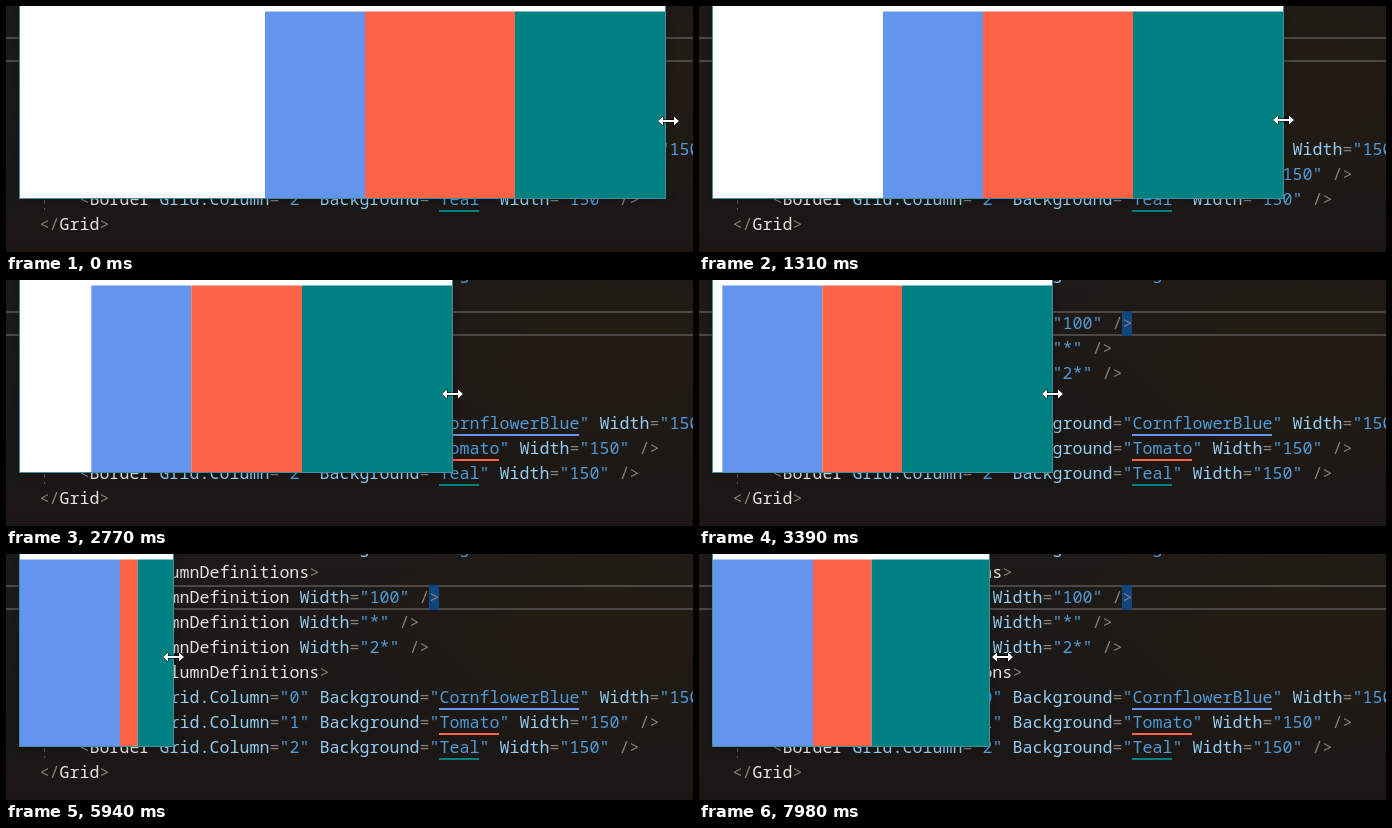
These frames come from a looping animation (687x246 px, 8 s). An HTML page:

```html
<!DOCTYPE html>
<html lang="en">
<head>
<meta charset="utf-8">
<title>Resizing a grid</title>
<style>
  html, body { margin: 0; width: 100%; height: 100%; overflow: hidden; background: #1b1816; }
  svg {
    display: block; width: 687px; height: 246px;
    background:
      radial-gradient(ellipse 260px 130px at 600px 85px, #241c13 0, #241c1300 100%),
      linear-gradient(#1e1a17, #1b1816 60%, #1c1715);
  }
  text { font: 300 16.667px "Noto Sans Mono", "DejaVu Sans Mono", monospace; white-space: pre; }
  .mark { fill: #857f78; }
  .name { fill: #e4e4e2; }
  .attr { fill: #93cdf3; }
  .value { fill: #4f9bd8; }
  #win { filter: drop-shadow(0 0 5px rgba(0, 0, 0, .25)); }
</style>
</head>
<body>
<svg viewBox="0 0 687 246">
  <path d="M0 32H687M0 55H687" stroke="#4b4845" stroke-width="2"/>
  <path d="M38.5 130V204" stroke="#55504b" stroke-dasharray="4 4"/>
  <rect x="423" y="31" width="10" height="25" fill="#11457e"/>
  <g id="code"></g>
  <g id="win">
    <rect id="frame" x="13" y="-10" height="203" fill="#3f8fa3"/>
    <rect id="inside" x="14" y="-10" height="202" fill="#fff"/>
    <g id="columns"></g>
  </g>
  <path id="cursor" d="M-10.5 0L-5.5 -4.5V-1H5.5V-4.5L10.5 0L5.5 4.5V1H-5.5V4.5Z"
    fill="#fff" stroke="#000" paint-order="stroke" stroke-linejoin="round"/>
</svg>
<script>
const $ = id => document.getElementById(id);

function add(parent, tag, attrs) {
  const el = document.createElementNS('http://www.w3.org/2000/svg', tag);
  for (const name in attrs) el.setAttribute(name, attrs[name]);
  parent.append(el);
  return el;
}

const colours = { CornflowerBlue: '#6495ed', Tomato: '#ff6347', Teal: '#008080' };
const names = Object.keys(colours);

const source = [
  '<Grid Height="200" HorizontalAlignment="Right">',
  '    <Grid.ColumnDefinitions>',
  ...['100', '*', '2*'].map(w => `        <ColumnDefinition Width="${w}" />`),
  '    </Grid.ColumnDefinitions>',
  ...names.map((c, i) => `    <Border Grid.Column="${i}" Background="${c}" Width="150" />`),
  '</Grid>'
];

function kind(token, before) {
  if (token[0] === '"') return 'value';
  if (!/\w/.test(token)) return 'mark';
  return /<\/?$/.test(before) ? 'name' : 'attr';
}

source.forEach((line, row) => {
  const y = row * 25 - 1;
  for (const { 0: token, index } of line.matchAll(/"[^"]*"|[\w.]+|[^\w."\s]+/g)) {
    const x = 33 + index * 10;
    add($('code'), 'text', { x: x + .5, y, class: kind(token, line.slice(0, index)) }).textContent = token;
    const word = token.slice(1, -1);
    if (colours[word]) {
      add($('code'), 'rect', { x: x + 10, y: y + 5, width: word.length * 10, height: 2, fill: colours[word] });
    }
  }
});

const columns = names.map(c => add($('columns'), 'rect', { y: 5.5, height: 186.5, fill: colours[c] }));

// time, right edge of the window, pointer height
const keys = [
  [340, 659, 115], [2151, 519, 113], [2850, 436, 114], [3383, 353, 114],
  [4615, 265, 117], [5400, 200, 108], [5924, 167, 103], [6617, 143, 103]
];
const step = 77, back = 6960;

// The window redraws once per step.
function snap(t) {
  if (t < 380) return 0;
  const start = t < back ? 380 : back;
  return start + step * Math.floor((t - start) / step);
}

function shrink(t) {
  const i = Math.max(1, keys.findIndex(k => k[0] > t));
  const last = keys[keys.length - 1];
  if (t >= last[0]) return last;
  const a = keys[i - 1], b = keys[i];
  const p = Math.max(0, (t - a[0]) / (b[0] - a[0]));
  return a.map((v, n) => v + (b[n] - v) * p);
}

function draw(time) {
  const t = snap(time);
  const [, narrow, y] = shrink(t);
  const grow = Math.max(0, (t + step - back) / (14 * step));
  const edge = Math.round(narrow + 147 * grow ** 1.67);
  const lead = Math.max(2.5 - t / 400, -.5) + 13 * grow;

  // Columns are 100, * and 2* wide; content is at most 150.
  const star = (edge - 114) / 3;
  const widths = [100, Math.min(150, star), Math.min(150, 2 * star)];
  let x = edge - widths[0] - widths[1] - widths[2];
  columns.forEach((rect, i) => {
    rect.setAttribute('x', x);
    rect.setAttribute('width', widths[i]);
    x += widths[i];
  });
  $('frame').setAttribute('width', edge - 12);
  $('inside').setAttribute('width', edge - 14);
  $('cursor').setAttribute('transform', `translate(${Math.round(edge + lead) + .5} ${Math.round(y)})`);
}

const begin = performance.now();
function tick() {
  draw((performance.now() - begin) % 8000);
  requestAnimationFrame(tick);
}
tick();
</script>
</body>
</html>
```
